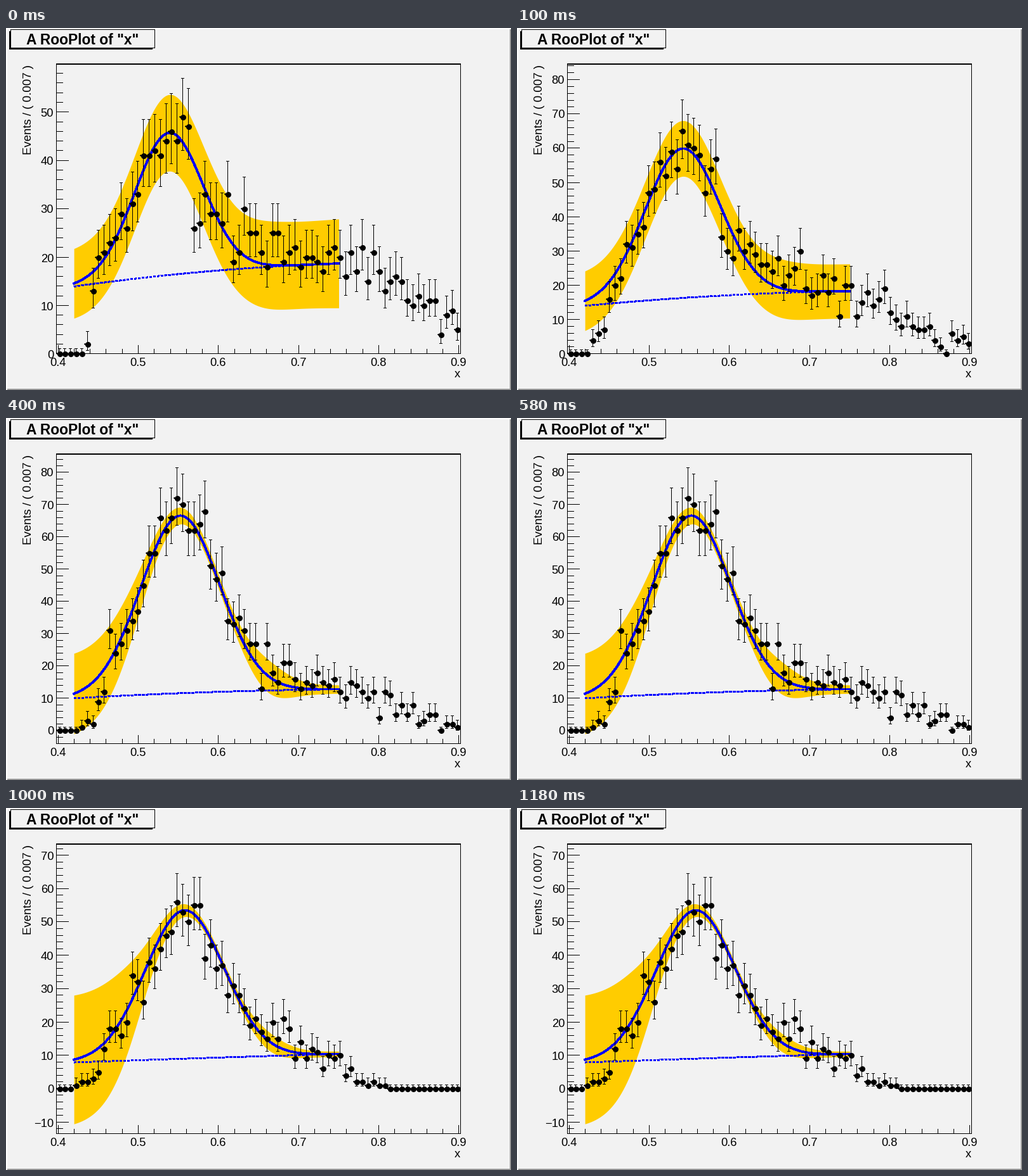
A matplotlib script for the animation above (1.3 s loop, 796 px wide and 572 px high).

```python
import numpy as np
import matplotlib.pyplot as plt
from matplotlib.animation import ArtistAnimation
from matplotlib.collections import LineCollection
from matplotlib.patches import Rectangle

W, H, DPI = 796, 572, 100
PX = 72 / DPI  # points per pixel
LEFT, RIGHT, TOP, BOTTOM = 79.6, 716.4, 57.2, 514.8
X_MIN, X_MAX = 0.398, 0.902
BINS = 72
BG, GOLD, BLUE = "#f2f2f2", "#ffcc00", "#0000ff"
FIT = np.linspace(106.6, 524, 140)
CENTRES = LEFT + (np.arange(BINS) + 0.5) * (RIGHT - LEFT) / BINS

plt.rcParams["font.family"] = "Liberation Sans"
fig = plt.figure(figsize=(W / DPI, H / DPI), dpi=DPI, facecolor=BG)
ax = fig.add_axes([0, 0, 1, 1])
ax.set_xlim(-0.5, W - 0.5)
ax.set_ylim(H - 0.5, -0.5)
ax.axis("off")


def box(x0, y0, x1, y1, color):
    ax.add_patch(Rectangle((x0 - 0.5, y0 - 0.5), x1 - x0, y1 - y0,
                           fc=color, lw=0, aa=False))


def text(x, y, s, size=18.4, **kw):
    return ax.text(x, y, s, fontsize=size * PX, va="baseline", **kw)


def strokes(segs):
    lines = LineCollection(segs, colors="k", linewidths=PX, antialiaseds=False,
                           capstyle="projecting", zorder=3)
    lines.set_snap(False)
    return ax.add_collection(lines)


def gauss(x, mean, sigma):
    return np.exp(-0.5 * ((x - mean) / sigma) ** 2)


def fall(x, mid, width):
    """Smooth step from one down to zero."""
    return 1 / (1 + np.exp((x - mid) / width))


def poisson_range(n):
    """Central 68% interval (Wilson-Hilferty)."""
    if n == 0:
        return 0, 1.148
    m = n + 1
    return (n * (1 - 1 / (9 * n) - 1 / (3 * n ** 0.5)) ** 3,
            m * (1 - 1 / (9 * m) + 1 / (3 * m ** 0.5)) ** 3)


def draw_static():
    box(0, 0, W, 2, "white")
    box(0, 0, 2, H, "white")
    box(2, H - 2, W, H, "#999999")
    box(W - 2, 2, W, H, "#999999")
    # title with its shadow
    box(5, 5, 231, 34, "black")
    box(7, 2, 235, 32, "black")
    box(8, 3, 234, 31, BG)
    text(120.5, 26, 'A RooPlot of "x"', 22.8, ha="center", weight="bold")
    # frame
    box(79, 56, 717, 58, "black")
    segs = [[(79, 57), (79, 514)], [(716, 57), (716, 514)],
            [(79, 514), (716, 514)]]
    # x axis
    for k in range(26):
        v = 0.4 + 0.02 * k
        x = int(LEFT + (v - X_MIN) / (X_MAX - X_MIN) * (RIGHT - LEFT))
        segs.append([(x, 514), (x, 507 if k % 5 else 501)])
        if k % 5 == 0:
            text(x - 0.7, 533, f"{v:.1f}", ha="center")
    strokes(segs)
    text(711, 552, "x", ha="center")
    text(40, 57, "Events / ( 0.007 )", 18.7, ha="right",
         rotation=90, rotation_mode="anchor")


def draw_counts(seed, mean, hi):
    """Whole counts scattered about a mean, kept below the top of the axis."""
    noise = np.random.default_rng(seed).normal(size=BINS)
    top = hi / 1.05
    counts = np.rint(mean + 0.8 * np.sqrt(mean) * noise)
    return np.clip(counts, 0, int(top - top ** 0.5)).astype(int)


def scene(seed, lo, hi, bkg, peak, band, rise, tail):
    """Artists of one data set.

    bkg: left, middle, right level; peak: mean, sigma, height;
    band: half width at left and right, extra at far left, extra on the slope;
    rise: where and how softly data set in; tail: where and how fast they fade.
    """
    def ypx(v):
        return BOTTOM - (v - lo) / (hi - lo) * (BOTTOM - TOP)

    def background(x):
        return np.polyval(np.polyfit([107, 334, 524], bkg, 2), x)

    def model(x):
        return background(x) + peak[2] * gauss(x, *peak[:2])

    arts = []
    # y axis
    ticks = []
    for v in range(2 * int(np.ceil(lo / 2)), int(hi) + 1, 2):
        y = int(ypx(v))
        ticks.append([(79, y), (89 if v % 10 else 98, y)])
        if v % 10 == 0:
            label = str(v).replace("-", "\u2212")
            arts.append(text(74.5, y + 7, label, ha="right"))
    arts.append(strokes(ticks))

    # fit, its error band and the background
    start, end, far, slope = band
    half = (np.linspace(start, end, FIT.size) + far * fall(FIT, 205, 22)
            + slope * gauss(FIT, 412, 32))
    total = model(FIT)
    arts.append(ax.fill_between(FIT, ypx(total - half), ypx(total + half),
                                color=GOLD, lw=0, aa=False, zorder=1))
    arts += ax.plot(FIT, ypx(background(FIT)), color=BLUE, lw=2.4 * PX, aa=False,
                    zorder=2, ls=(0, (1.5, 0.9)), dash_capstyle="butt")
    arts += ax.plot(FIT, ypx(total), color=BLUE, lw=2.8 * PX, aa=False, zorder=2)

    # data follow the fit plus a shoulder, cut off softly at both ends
    mean = model(np.minimum(CENTRES, 524)) + 6 * gauss(CENTRES, 425, 32)
    mean *= 1 - fall(CENTRES, *rise)
    mean *= gauss(np.maximum(CENTRES, tail[0]), *tail)
    counts = draw_counts(seed, mean, hi)
    xs, ys = CENTRES.astype(int), ypx(counts).astype(int)
    bars = []
    for x, y, n in zip(xs, ys, counts):
        y0, y1 = (int(ypx(v)) for v in poisson_range(n))
        bars += [[(x, y0), (x, y1)], [(x - 5, y), (x + 5, y)]]
        bars += [[(x - 2, e), (x + 2, e)] for e in (y0, y1)]
        bars += [[(e, y - 1), (e, y + 1)] for e in (x - 4, x + 4)]
    arts.append(strokes(bars))
    arts += ax.plot(xs, ys, "o", color="k", ms=9 * PX, mew=0, zorder=4)
    return arts


draw_static()

first = scene(1, 0, 59.9, bkg=(14, 17.3, 18.75), peak=(256.5, 54, 29.4),
              band=(7.2, 9.2, 0, 0.4), rise=(133, 2), tail=(545, 110))
second = scene(2, 0, 84.5, bkg=(14.1, 17.2, 18.4), peak=(260.5, 59, 43.6),
               band=(8.2, 7.9, 0.5, 0.6), rise=(141, 10), tail=(460, 130))
third = scene(3, -4.1, 85.64, bkg=(10.1, 12.1, 12.9), peak=(274, 62, 55),
              band=(2.8, 1.3, 9.8, 3.4), rise=(143, 11), tail=(540, 85))
fourth = scene(4, -7.13, 88.9, bkg=(9.4, 11.3, 12.3), peak=(278, 62, 55),
               band=(2.7, 0.8, 11.7, 2.2), rise=(143, 11), tail=(480, 100))
fifth = scene(5, -13.55, 73.3, bkg=(7.95, 9.4, 10.5), peak=(281, 62, 44.5),
              band=(1.8, 0.8, 17.7, 1.7), rise=(143, 11), tail=(500, 35))

# the first data set shows for one tick, the others for three
reel = [first] + [s for s in (second, third, fourth, fifth) for _ in range(3)]
anim = ArtistAnimation(fig, reel, interval=100, repeat=True, repeat_delay=0)
plt.show()
```
